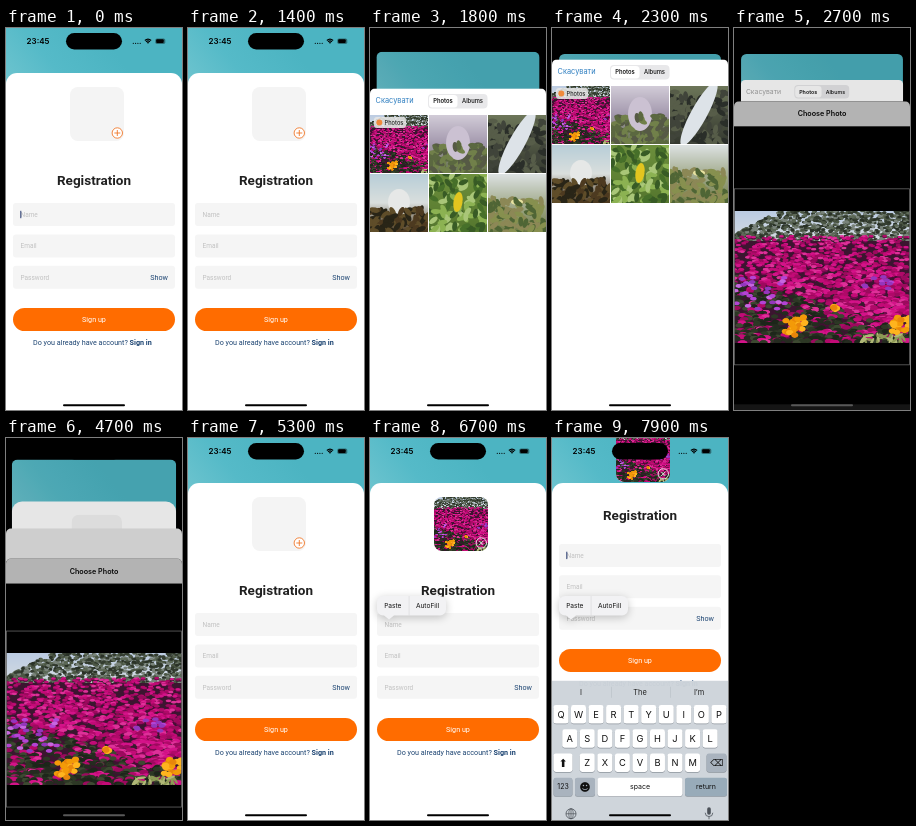
An HTML page with a canvas that plays this animation: 176 by 382 pixels, repeating every 8000 ms.

```html
<!DOCTYPE html>
<html lang="en">
<head>
<meta charset="utf-8">
<title>Registration</title>
<style>
html, body { margin: 0; width: 100%; height: 100%; overflow: hidden; background: #000; }
canvas { display: block; width: 176px; height: 382px; }
</style>
</head>
<body>
<canvas id="stage"></canvas>
<script>
const W = 176, H = 382, LOOP = 8000;
const UI = 'Inter, sans-serif', APP = 'Roboto, sans-serif', SYMBOLS = '"DejaVu Sans", sans-serif';
const NAVY = '#1b4371', ORANGE = '#ff6c00', FIELD = '#f5f5f5', HINT = '#c2c2c2';
const canvas = document.getElementById('stage');
const dpr = window.devicePixelRatio || 1;
canvas.width = W * dpr;
canvas.height = H * dpr;
let c = canvas.getContext('2d');
const stage = c;

// ---------- helpers ----------
const ramp = (t, a, b) => Math.min(1, Math.max(0, (t - a) / (b - a)));
function spring(t, start, speed) {
  const k = Math.max(0, t - start) / 1000 * speed;
  return 1 - (1 + k) * Math.exp(-k);
}
function rect(x, y, w, h, fill) { c.fillStyle = fill; c.fillRect(x, y, w, h); }
function box(x, y, w, h, r, fill) {
  c.beginPath(); c.roundRect(x, y, w, h, r);
  c.fillStyle = fill; c.fill();
}
function oval(x, y, rx, ry, fill, turn = 0) {
  c.beginPath(); c.ellipse(x, y, rx, ry, turn, 0, 7);
  c.fillStyle = fill; c.fill();
}
function ring(x, y, rx, ry, stroke, width) {
  c.beginPath(); c.ellipse(x, y, rx, ry, 0, 0, 7);
  c.strokeStyle = stroke; c.lineWidth = width; c.stroke();
}
function cross(x, y, r, turn, stroke, width) {
  c.save();
  c.translate(x, y); c.rotate(turn);
  c.beginPath();
  c.moveTo(-r, 0); c.lineTo(r, 0);
  c.moveTo(0, -r); c.lineTo(0, r);
  c.strokeStyle = stroke; c.lineWidth = width; c.stroke();
  c.restore();
}
function text(s, x, y, size, color, { align = 'left', weight = 400, font = UI } = {}) {
  c.font = `${weight} ${size}px ${font}`;
  c.textAlign = align; c.fillStyle = color;
  c.fillText(s, x, y + size * 0.355);
  return c.measureText(s).width;
}
function gradient(x1, y1, x2, y2, ...colors) {
  const g = c.createLinearGradient(x1, y1, x2, y2);
  colors.forEach((color, i) => g.addColorStop(i / Math.max(1, colors.length - 1), color));
  return g;
}
function random(seed) {
  return () => (seed = (seed * 16807) % 2147483647) / 2147483647;
}
function picture(w, h, paint) {
  const layer = document.createElement('canvas');
  layer.width = w * 2; layer.height = h * 2;
  c = layer.getContext('2d');
  c.scale(2, 2);
  paint();
  c = stage;
  return layer;
}
// Clips a rounded panel at (x, y), scaled, and paints in its own coordinates.
function panel(x, y, scale, corners, paint) {
  c.save();
  c.translate(x, y); c.scale(scale, scale);
  c.beginPath(); c.roundRect(0, 0, W, H, corners); c.clip();
  paint();
  c.restore();
}

// ---------- photos ----------
const flowers = picture(W, 132, () => {
  const rnd = random(41);
  const pick = list => list[Math.floor(rnd() * list.length)];
  const scatter = (n, paint) => { for (let i = 0; i < n; i++) paint(rnd() * W, i / n); };

  rect(0, 0, W, 132, gradient(0, 0, 0, 30, '#bccce2', '#d5dce2'));
  scatter(1100, x => {
    const crest = Math.max(0, 24 - x * 0.55);
    oval(x, crest + rnd() * (34 - crest), 2, 1.4, pick(['#343d30', '#4b5644', '#5d6957', '#79837a', '#2a3227']));
  });
  rect(0, 30, W, 102, '#3c1530');
  // rows of blossom heads, each over its own shadow, growing towards the viewer
  scatter(1500, (x, depth) => {
    const y = 25 + depth * 107, r = 1.6 + depth * 1.9;
    const meadow = y > 64 + x * 0.32;
    if (meadow && rnd() < 0.74) {
      oval(x, y, r * 1.2, r * 0.7, pick(['#1d261a', '#2d3825', '#3d4931', '#252b20']));
      return;
    }
    oval(x, y + r * 0.7, r * 1.4, r * 0.7, pick(['#4d0b37', '#75094f', '#33202b']));
    oval(x, y, r * 1.4, r * 0.7, pick(['#c30b77', '#d41389', '#b00a69', '#9c0a5e', '#de3199']));
  });
  scatter(38, (x, i) => {
    const right = i > 0.72;
    oval(right ? 130 + x / 4 : x * 0.3, 66 + rnd() * (right ? 14 : 34), 3.3, 1.9, pick(['#b344d4', '#c767e0', '#9436bd']));
  });
  scatter(22, x => oval(118 + x / 3, 124 + rnd() * 8, 5, 1.3, pick(['#8e9a55', '#b0b877']), rnd() * 3));
  for (const [x, y, spread] of [[61, 115, 11], [101, 97, 2], [167, 113, 10]]) {
    for (let i = 0; i < 4 + spread * 2; i++)
      oval(x + (rnd() - 0.5) * spread * 1.8, y + (rnd() - 0.5) * spread * 1.7, 3.6, 2.7, pick(['#f39a08', '#ffb41e', '#e8860b']));
  }
});

// Soft backdrop, seeded foliage, and one bright shape (a fall, leaf or bloom).
function landscape(seed, sky, leaves, accent, rx, ry, turn, horizon) {
  return picture(58, 58, () => {
    const rnd = random(seed);
    rect(0, 0, 58, 58, gradient(0, 0, 0, 58, ...sky));
    const grow = n => {
      for (let i = 0; i < n; i++)
        oval(rnd() * 58, horizon + rnd() * (60 - horizon), 5, 2.5, leaves[i % leaves.length], rnd() * 3);
    };
    grow(110);
    oval(29, 28, rx, ry, accent, turn);
    if (horizon > 20) grow(20);
  });
}
const thumbs = [
  landscape(3, ['#d2ccd8', '#a398ad', '#66754a'], ['#5b6840', '#71804a', '#565a45'], '#cbc1d2', 12, 17, 0, 30),
  landscape(5, ['#6d7659', '#34382f'], ['#40443a', '#2a2e29', '#575d49'], '#dde3e8', 8, 36, 0.5, 6),
  landscape(11, ['#b8ced8', '#dadfdd', '#4d3a20'], ['#4d3a20', '#292517', '#5f4d29'], '#e6e8e7', 11, 13, 0, 36),
  landscape(7, ['#6c8f3c', '#55762e'], ['#47702a', '#8cb252', '#a9c678', '#385b25'], '#e2c51f', 4.5, 10, 0.15, 0),
  landscape(19, ['#dde2e3', '#a5ae91', '#6e7a45'], ['#8c8856', '#4f6535', '#87904f'], '#e7e2a0', 6, 3, 0, 26)
];

// ---------- registration screen ----------
function avatar(y, hasPhoto) {
  c.save();
  c.beginPath(); c.roundRect(64, y, 54, 54, 8); c.clip();
  rect(64, y, 54, 54, '#f4f4f4');
  if (hasPhoto) c.drawImage(flowers, 44, 0, 264, 264, 64, y, 54, 54);
  c.restore();
  const x = 111.3, color = hasPhoto ? '#f2f2f2' : '#f0782a';
  if (!hasPhoto) oval(x, y + 46, 5.4, 5.4, '#fff');
  ring(x, y + 46, 5.2, 5.2, color, 0.9);
  cross(x, y + 46, 3, hasPhoto ? Math.PI / 4 : 0, color, 0.9);
}

function registration(lift, hasPhoto, caret) {
  rect(0, 0, W, H, gradient(0, 70, 90, 0, '#72c6d0', '#55bac8', '#4cb4c2'));
  box(0, 45, W, H, 11, '#fff');
  const up = lift * 69;
  avatar(59 - up, hasPhoto);
  text('Registration', 88, 152.5 - lift * 75, 13.5, '#212121', { align: 'center', weight: 700, font: APP });
  ['Name', 'Email', 'Password'].forEach((hint, i) => {
    const y = 175 + i * 31.4 - up;
    box(7, y, 162, 23, 3, FIELD);
    text(hint, 14.5, y + 11.5, 6.5, HINT, { font: APP });
  });
  text('Show', 162, 249.5 - up, 7.2, NAVY, { align: 'right', font: APP });
  c.globalAlpha = caret;
  rect(14.3, 182.8 - up, 1, 7.4, '#273a70');
  c.globalAlpha = 1;
  box(7, 280 - up, 162, 23, 11.5, ORANGE);
  text('Sign up', 88, 291.5 - up, 7.2, '#fff', { align: 'center', font: APP });
  const used = text('Do you already have account? ', 27, 314.5 - up, 7.2, NAVY, { font: APP });
  text('Sign in', 27 + used, 314.5 - up, 7.2, NAVY, { weight: 700, font: APP });
}

// Plain black, so it vanishes against the backdrop of an open sheet.
function statusBar() {
  text('23:45', 32, 13.3, 8, '#000', { align: 'center', weight: 600 });
  box(60, 5, 56, 16.5, 8.25, '#000');
  for (let i = 0; i < 4; i++) oval(127.3 + i * 2.3, 15.3, 0.6, 0.6, '#000');
  for (let i = 0; i < 3; i++) {
    c.beginPath(); c.arc(142, 16, 1.2 + i * 1.75, -2.3, -0.84);
    c.strokeStyle = '#000'; c.lineWidth = 1.2; c.stroke();
  }
  box(149.3, 10.4, 10, 5.6, 1.7, 'rgba(0,0,0,.4)');
  box(150.2, 11.3, 7.5, 3.8, 1, '#000');
}

function root(p, lift, hasPhoto, caret) {
  const s = 1 - 0.08 * p;
  panel(W / 2 * (1 - s), 26 * p, s, 6 * Math.min(1, p * 3), () => {
    registration(lift, hasPhoto, caret);
    rect(0, 0, W, H, `rgba(0,0,0,${0.12 * p})`);
  });
}

// ---------- sheets ----------
function picker(y, back) {
  const s = 1 - 0.08 * back;
  panel(W / 2 * (1 - s), y, s, 5, () => {
    rect(0, 0, W, H, '#fff');
    text('Скасувати', 5.5, 12, 7.4, back > 0.3 ? '#a0a0a0' : '#2f7fc0');
    box(58, 5.5, 59.5, 14.5, 4, '#e8e8ea');
    box(59, 6.5, 28.5, 12.5, 3.5, '#fff');
    text('Photos', 73, 12.8, 5.8, '#111', { align: 'center', weight: 600 });
    text('Albums', 102.5, 12.8, 5.8, '#111', { align: 'center', weight: 500 });
    c.drawImage(flowers, 20, 0, 264, 264, 0, 26.5, 58, 58);
    thumbs.forEach((img, i) => {
      const cell = i + 1;
      c.drawImage(img, cell % 3 * 59, 26.5 + Math.floor(cell / 3) * 59, 58, 58);
    });
    box(4, 28.5, 32, 11, 3, 'rgba(232,232,232,.88)');
    oval(9.3, 34, 3, 3, '#f08a3c');
    text('Photos', 14.5, 34.2, 5.7, '#222', { weight: 500 });
    rect(0, 0, W, H, `rgba(0,0,0,${0.1 * back})`);
  });
}

function cropper(y, squeeze) {
  panel(0, y, 1, [5, 5, 0, 0], () => {
    rect(0, 0, W, H, '#000');
    rect(0, 0, W, 25, '#b3b3b3');
    text('Choose Photo', 88, 12.5, 7.2, '#0a0a0a', { align: 'center', weight: 600 });
    const top = 87.5 - 15 * squeeze;
    c.drawImage(flowers, 0, top + 22, W, 132);
    c.strokeStyle = '#666'; c.lineWidth = 0.8;
    c.strokeRect(0.4, top, W - 0.8, 176);
    rect(0, 303, W, 90, '#151515');
    text('Cancel', 6, 319.5, 7.3, '#fff');
    text('Choose', 170, 319.5, 7.3, '#fff', { align: 'right' });
  });
}

// ---------- edit menu and keyboard ----------
function editMenu(alpha) {
  c.save();
  c.globalAlpha = alpha;
  c.shadowColor = 'rgba(0,0,0,.22)';
  c.shadowBlur = 9; c.shadowOffsetY = 2;
  c.beginPath();
  c.roundRect(7, 158, 69, 19.5, 6);
  c.moveTo(14, 177.4); c.lineTo(19, 181.5); c.lineTo(24, 177.4);
  c.fillStyle = '#f2f2f4'; c.fill();
  c.shadowColor = 'transparent';
  rect(38.8, 158, 0.5, 19.5, '#d0d0d3');
  text('Paste', 22.8, 167.8, 6.6, '#111', { align: 'center' });
  text('AutoFill', 57.5, 167.8, 6.6, '#111', { align: 'center' });
  c.restore();
}

function key(x, row, w, label, { fill = '#fff', size = 9.3, font = UI } = {}) {
  const y = 24.3 + row * 24.2;
  box(x, y + 0.7, w, 18.5, 2.4, '#8d949c');
  box(x, y, w, 18.5, 2.4, fill);
  text(label, x + w / 2, y + 9.3, size, '#111', { align: 'center', font });
}

function keyboard(y) {
  const GREY = '#a9b3be', INK = '#4b5158', pitch = 17.55;
  c.save();
  c.translate(0, y);
  rect(0, 0, W, 160, 'rgba(206,212,218,.97)');
  ['I', 'The', 'I’m'].forEach((word, i) => {
    text(word, 29 + i * 59, 11.3, 7.4, '#222', { align: 'center' });
    if (i) rect(i * 59, 6, 0.5, 11, '#b3bac1');
  });
  ['QWERTYUIOP', 'ASDFGHJKL', 'ZXCVBNM'].forEach((letters, row) => {
    const left = (W - letters.length * pitch) / 2 + 1.2;
    [...letters].forEach((letter, i) => key(left + i * pitch, row, 15, letter));
  });
  key(1.5, 2, 19, '⬆', { font: SYMBOLS, size: 11 });
  key(154.5, 2, 20, '⌫', { fill: GREY, font: SYMBOLS });
  key(1.5, 3, 19, '123', { fill: GREY, size: 7 });
  key(23, 3, 20, '☻', { fill: GREY, font: SYMBOLS, size: 11 });
  key(45.5, 3, 85, 'space', { size: 7 });
  key(133, 3, 42, 'return', { fill: '#98abb9', size: 7 });

  ring(19, 133, 5, 5, INK, 0.8);
  ring(19, 133, 2.2, 5, INK, 0.7);
  cross(19, 133, 5, 0, INK, 0.7);
  box(155.2, 126.5, 3.6, 7.5, 1.8, INK);
  c.beginPath(); c.arc(157, 132, 3.8, 0, Math.PI);
  c.strokeStyle = INK; c.lineWidth = 0.8; c.stroke();
  rect(156.6, 135.8, 0.8, 2.7, INK);
  c.restore();
}

// ---------- timeline ----------
function caretAlpha(t) {
  if (t > 6000) return ramp(t, 6850, 7100);
  const beat = t % 1000;
  return t < 1400 ? 1 - ramp(beat, 40, 180) + ramp(beat, 340, 480) : 0;
}

function draw(t) {
  const closing = t > 4650;
  // dismissal stalls briefly while the chosen picture is processed
  const held = t - Math.min(200, Math.max(0, t - 4900));
  const shown = closing ? 1 - spring(held, 4657.5, 17) : spring(t, 1390, 10);
  const p = shown < 0.006 ? 0 : shown;
  const crop = spring(t, 2420, 13);
  const typing = spring(t, 7570, 13);

  c.setTransform(dpr, 0, 0, dpr, 0, 0);
  rect(0, 0, W, H, '#000');
  root(p, typing / 0.927, t >= 5600, caretAlpha(t));
  statusBar();

  const top = H - 351 * p;
  if (closing && p > 0) {
    box(0, top, W, H, 5, '#cecece');
    cropper(top + 30, 1);
  } else if (p > 0) {
    const sag = 21 * Math.min(1, crop * 4, (1 - crop) / 0.12);
    if (crop < 0.995) picker(top + sag, Math.min(1, crop * 1.1));
    if (crop > 0) cropper(H - 351 * crop, 0);
  }
  if (typing > 0) keyboard(H - 150 * typing);
  const menu = ramp(t, 6080, 6300);
  if (menu > 0) editMenu(menu);

  box(57, 376.2, 62, 2, 1, crop > 0.5 && p > 0.12 ? '#585858' : '#000');
}

function frame() {
  draw(performance.now() % LOOP);
  requestAnimationFrame(frame);
}
frame();
</script>
</body>
</html>
```
